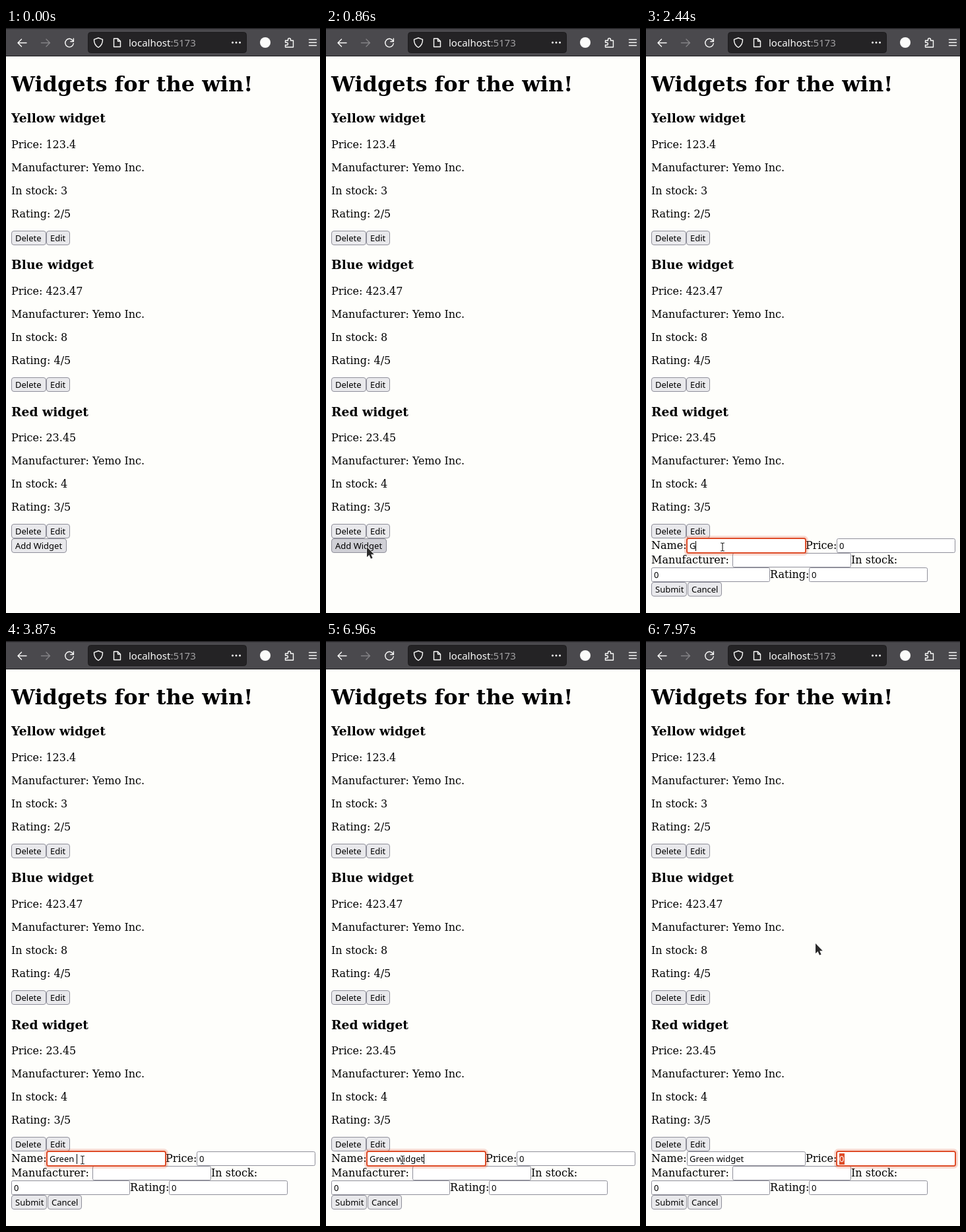
Animation of 476 by 886 pixels, one loop 8 s. Source, as an HTML page:

```html
<!DOCTYPE html>
<html lang="en">
<head>
<meta charset="utf-8">
<title>Widgets</title>
<style>
  html, body { margin: 0; width: 100%; height: 100%; overflow: hidden; background: #fefefb; }
  svg { display: block; }
  text { white-space: pre; fill: #000; }
  .serif { font: 16px "DejaVu Serif", serif; }
  .h1 { font: bold 32px "DejaVu Serif", serif; }
  .h3 { font: bold 18.72px "DejaVu Serif", serif; }
  .ui { font: 13px "Noto Sans", "Open Sans", sans-serif; }
  .url { font: 15px "Noto Sans", "Open Sans", sans-serif; }
  .icon { fill: none; stroke: #fbfbfa; stroke-width: 1.4; stroke-linecap: round; stroke-linejoin: round; }
</style>
</head>
<body>
<svg id="stage" width="476" height="886" viewBox="0 0 476 886">
  <rect width="476" height="886" fill="#fefefb"/>
  <g id="toolbar">
    <rect width="476" height="43" fill="#4a494d"/>
    <rect width="476" height="1.5" fill="#222124"/>
    <rect y="42" width="476" height="1" fill="#1b1a1d"/>
    <rect x="124.5" y="6.5" width="240" height="31" rx="4" fill="#242325" stroke="#1c1b1d"/>
    <g class="icon">
      <path d="M31 22.5H18M23.5 17L18 22.5L23.5 28"/>
      <path d="M53.500 22.500H66.500M61 17L66.500 22.500L61 28" stroke="#858487"/>
      <path d="M101.600 19.500A6.300 6.300 0 1 0 102.300 23.500M102.400 16V20.500H97.900"/>
      <path d="M140 15L146.500 17.300C146.700 23 144.500 27 140 29.500C135.500 27 133.300 23 133.500 17.300Z"/>
      <path d="M163.500 16H169.500L173.500 20V28.500H163.500ZM169.500 16V20H173.500"/>
      <path d="M423.500 19H427.500V17.500A2 2 0 0 1 431.500 17.500V19H435.500V29H423.500V25.800H425.500A1.900 1.900 0 0 0 425.500 22H423.500Z"/>
      <path d="M459.500 17.500H470.500M459.500 22H470.500M459.500 26.500H470.500"/>
    </g>
    <g fill="#fbfbfa">
      <circle cx="343.500" cy="22" r="1.500"/>
      <circle cx="349" cy="22" r="1.500"/>
      <circle cx="354.500" cy="22" r="1.500"/>
      <circle cx="393" cy="22" r="8"/>
    </g>
    <text class="url" x="186" y="28" style="fill:#fbfbfa">localhost<tspan fill="#a2a1a3">:5173</tspan></text>
  </g>
  <g id="page"></g>
  <g id="add"></g>
  <g id="form"></g>
  <g id="arrow">
    <path d="M0 0V15.200L3.500 12L6 17.800L8.600 16.700L6.200 11.200H10.800Z"
      fill="#2a2a2a" stroke="#fff" stroke-width="1.200" paint-order="stroke" stroke-linejoin="round"/>
  </g>
  <g id="beam" fill="none">
    <path d="M-3 -6H-1L0 -5L1 -6H3M0 -5V5M-3 6H-1L0 5L1 6H3" stroke="#fff" stroke-width="3"/>
    <path d="M-3 -6H-1L0 -5L1 -6H3M0 -5V5M-3 6H-1L0 5L1 6H3" stroke="#2a2a2a" stroke-width="1.200"/>
  </g>
</svg>
<script>
const LOOP = 8000;
const FACE = '#e9e9ec', HOVER = '#d0d0d6', EDGE = '#8f8f9a', ACCENT = '#de4c28';
const $ = id => document.getElementById(id);
const page = $('page'), add = $('add'), form = $('form');

function el(parent, tag, attrs, content) {
  const node = document.createElementNS('http://www.w3.org/2000/svg', tag);
  for (const key in attrs) node.setAttribute(key, attrs[key]);
  if (content !== undefined) node.textContent = content;
  parent.appendChild(node);
  return node;
}

const label = (parent, style, x, y, content) => el(parent, 'text', { class: style, x, y }, content);

function box(parent, x, y, w, h, fill, stroke, rx) {
  return el(parent, 'rect', { x: x + .5, y: y + .5, width: w - 1, height: h - 1, rx, fill, stroke });
}

function button(parent, x, y, w, content) {
  const face = box(parent, x, y, w, 22, FACE, EDGE, 3.5);
  label(parent, 'ui', x + 6, y + 16, content);
  return face;
}

// Text field with a focus ring that can be shown or hidden
function field(x, y, value) {
  box(form, x, y, 180, 22, '#fff', EDGE, 2);
  const ring = el(form, 'g', {});
  el(ring, 'rect', { x: x - 2.5, y: y - 2.5, width: 185, height: 27, rx: 5, fill: 'none', stroke: ACCENT, 'stroke-width': 3, 'stroke-opacity': .2 });
  el(ring, 'rect', { x, y, width: 180, height: 22, rx: 2.5, fill: '#fff', stroke: ACCENT, 'stroke-width': 2 });
  const mark = el(form, 'rect', { x: x + 4, y: y + 3, width: 8, height: 17, fill: ACCENT });
  const text = label(form, 'ui', x + 4, y + 16, value);
  show(ring, false);
  show(mark, false);
  return { ring, mark, text };
}

function show(node, on) { node.style.display = on ? '' : 'none'; }

label(page, 'h1', 8, 96, 'Widgets for the win!');
[
  ['Yellow', 123.4, 3, 2, 143],
  ['Blue', 423.47, 8, 4, 365],
  ['Red', 23.45, 4, 3, 588]
].forEach(([color, price, stock, rating, y], i) => {
  label(page, 'h3', 8, y, color + ' widget');
  const top = 182 + i * 222;
  ['Price: ' + price, 'Manufacturer: Yemo Inc.', 'In stock: ' + stock, `Rating: ${rating}/5`]
    .forEach((line, n) => label(page, 'serif', 8, top + n * 35, line));
  button(page, 8, top + 125, 53, 'Delete');
  button(page, 61, top + 125, 36, 'Edit');
});

const addFace = button(add, 8, 773, 84, 'Add Widget');

label(form, 'serif', 8, 789, 'Name:');
label(form, 'serif', 242, 789, 'Price:');
label(form, 'serif', 8, 811, 'Manufacturer:');
label(form, 'serif', 311, 811, 'In stock:');
label(form, 'serif', 188, 833, 'Rating:');
field(131, 795, '');
field(8, 817, '0');
field(247, 817, '0');
button(form, 8, 839, 54, 'Submit');
button(form, 63, 839, 52, 'Cancel');
const name = field(62, 773, '');
const price = field(289, 773, '0');
const caret = el(form, 'rect', { y: 777, width: 1, height: 15, fill: '#000' });

const OPEN = 920, FOCUS = 1460, TAB = 7290;

// time, text, caret visible
const typing = [
  [0, '', true], [2440, 'G', true], [2670, 'Gr', true], [2740, 'Gre', true],
  [3100, 'Gre', false], [3270, 'Gree', true], [3480, 'Green', true],
  [3870, 'Green ', true], [3930, 'Green w', true], [4280, 'Green wd', true],
  [4580, 'Green wdi', true], [5050, 'Green wdi', false], [5950, 'Green wd', true],
  [6090, 'Green w', true], [6270, 'Green wi', true], [6380, 'Green wid', true],
  [6650, 'Green widg', true], [6680, 'Green widge', true], [6960, 'Green widget', true]
];

// time, x, y of the pointer
const path = [
  [70, 480, 560], [280, 170, 770], [470, 86, 803], [860, 62, 786], [920, 62, 786],
  [1230, 114, 788], [1850, 114, 788], [1920, 116, 786], [7430, 116, 786],
  [7640, 254, 690], [7970, 257, 458], [8000, 257, 458]
];

function pointer(t) {
  const i = path.findIndex(p => p[0] > t);
  if (i < 1) return [path[0][1], path[0][2]];
  const [t0, x0, y0] = path[i - 1], [t1, x1, y1] = path[i];
  const k = (t - t0) / (t1 - t0);
  return [x0 + (x1 - x0) * k, y0 + (y1 - y0) * k];
}

const inside = (x, y, left, top, w) => x > left && x < left + w && y > top && y < top + 22;

function render(t) {
  const open = t >= OPEN, focused = t >= FOCUS && t < TAB, tabbed = t >= TAB;
  const [, typed, lit] = typing.filter(step => step[0] <= t).pop();
  const [x, y] = pointer(t);

  show(add, !open);
  show(form, open);
  addFace.setAttribute('fill', inside(x, y, 8, 773, 84) ? HOVER : FACE);

  name.text.textContent = typed;
  show(name.ring, focused);
  show(caret, focused && lit);
  if (focused) {
    const width = typed ? name.text.getComputedTextLength() : 0;
    caret.setAttribute('x', Math.round(66 + width));
  }
  show(price.ring, tabbed);
  show(price.mark, tabbed);
  price.text.style.fill = tabbed ? '#fff' : '';

  const beam = open && inside(x, y, 62, 773, 180);
  const place = `translate(${Math.round(x)} ${Math.round(y)})`;
  $('arrow').setAttribute('transform', place);
  $('beam').setAttribute('transform', place);
  show($('arrow'), !beam && t >= 100);
  show($('beam'), beam);
}

const start = performance.now();
function tick() {
  render((performance.now() - start) % LOOP);
  requestAnimationFrame(tick);
}
tick();
</script>
</body>
</html>
```
